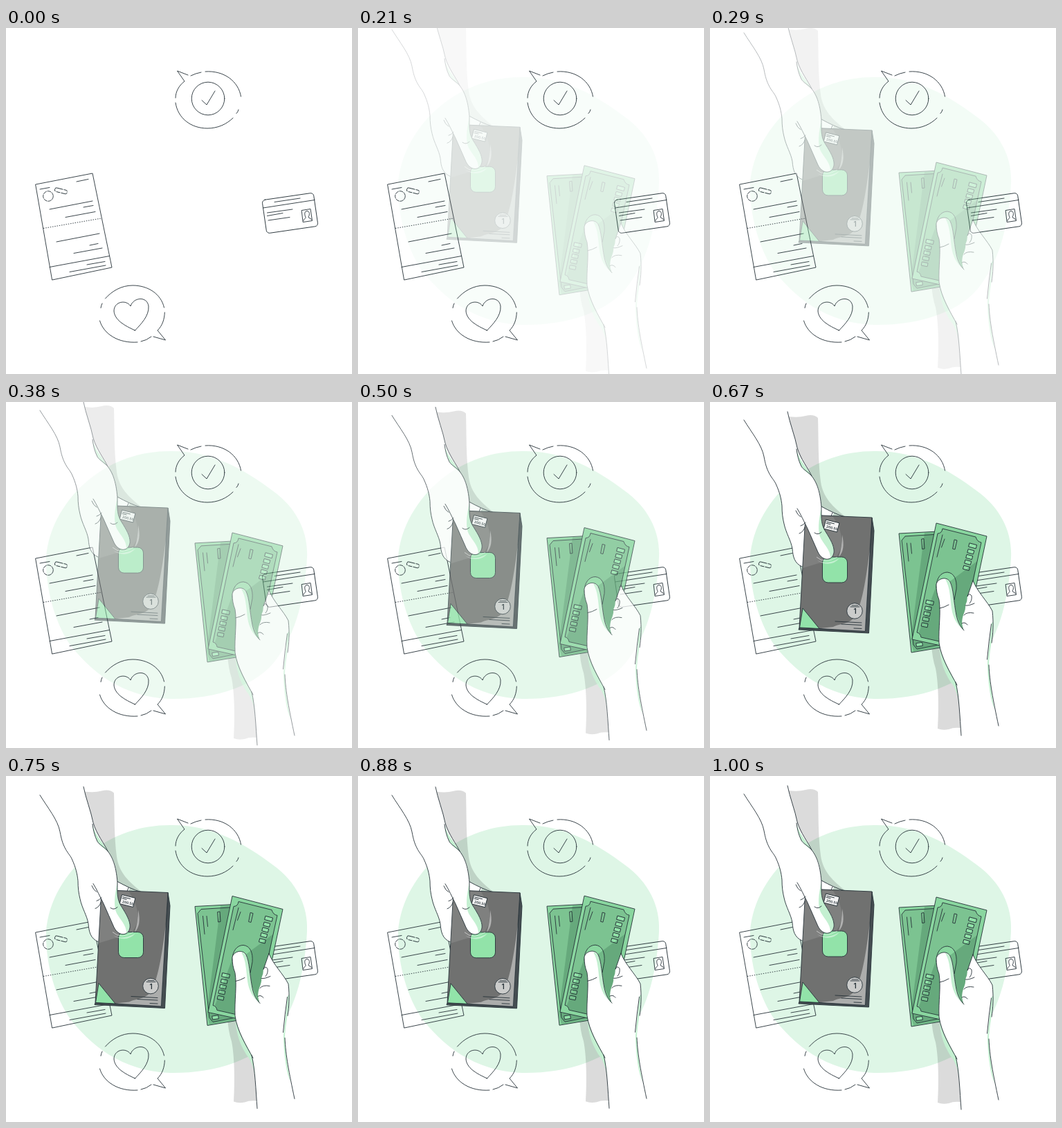
These frames come from a looping animation (500 by 500 pixels, 1.04 s). An HTML page:

```html
<!DOCTYPE html>
<html lang="en">
<head>
<meta charset="utf-8">
<title>Phone purchase</title>
<style>
  html, body { margin: 0; width: 100%; height: 100%; overflow: hidden; background: #fff; }
  svg { display: block; width: 100vw; height: 100vh; }
  .ink { fill: none; stroke: #263238; stroke-width: .9; stroke-linecap: round; stroke-linejoin: round; }
  .edge { stroke: #263238; stroke-width: .9; stroke-linejoin: round; }
  .skin { fill: #fff; }
  .tint { fill: #c4f0d1; }
  .shade { fill: #000; fill-opacity: .14; }
  .mint { fill: #92e3a9; }
  .note { fill: #89d69f; }
  .leaf { fill: #7cc391; }
  .dim { fill: #12402a; fill-opacity: .2; }
  text { font-family: Inter, Arial, sans-serif; fill: #263238; }
</style>
</head>
<body>
<svg viewBox="0 0 500 500">
  <defs>
    <rect id="cell" class="edge mint" x="-4.5" y="-2.6" width="9" height="5.2"/>
    <g id="cells">
      <rect class="edge mint" x="-5" y="-3" width="11" height="5.4"/>
      <use href="#cell" y="8.5"/>
      <use href="#cell" y="16.5"/>
      <use href="#cell" y="24.5"/>
      <use href="#cell" y="33"/>
    </g>
  </defs>

  <path id="blob" fill="#def6e6" d="M237 71C298 70 345 98 385 128C420 153 437 188 435 225C432 280 420 332 392 370C364 411 300 430 237 429C168 427 120 388 90 347C68 312 57 265 58 225C61 181 86 140 120 112C155 84 195 71 237 71Z"/>

  <!-- receipt -->
  <g class="ink">
    <path d="M43 226L125 210L153 346L67 364ZM63 345.500L149.500 329.500"/>
    <path stroke-dasharray="1.500 1.800" stroke-linecap="butt" d="M54 289.500L138 275"/>
    <path d="M49 233L63 230.500M102 222L119 218.500M63 262L125 250M112 259L126 256.500M86 273.500L129 265.500M73 309L135 297M121 314L133 311.500M98 325.500L139 318M117 342L143 337.500M92 352.500L144 343"/>
    <circle cx="61" cy="243" r="7.300" stroke-dasharray="5 1.600"/>
    <rect x="70.500" y="232.500" width="18" height="5.500" rx="2" transform="rotate(14 79 235)" stroke-dasharray="9 2 5 2"/>
  </g>

  <!-- identity card -->
  <g class="ink">
    <rect x="-37.500" y="-24.300" width="75" height="48.600" rx="4.500" transform="translate(410.500 267.500) rotate(-8.300)"/>
    <path d="M371.500 260L446 248.500M388 251.500L425 246M377.500 267L414 262M377.500 271.500L400 267.500M379 278L410 273.500"/>
    <path d="M427.500 263.500L440 261.500L442.500 278.500L429.500 280.500Z"/>
    <path d="M430 278.500C430 275 433.500 276 433 273.500C430.500 268 432 264.500 435 264.500C438.500 264.500 439.500 269 437 273C437 275.500 441 274 441.500 277"/>
  </g>

  <!-- speech bubbles -->
  <g class="ink">
    <path d="M263 68L247.500 62L258 77C250 83 245 92 245 101M245 108C248 130 267 145 291 145C306 145 319 139 328 130M333 123.500Q335.500 121 336 118M339.500 99C336 77 315 61 288 63M282 64Q274 65.500 267 69"/>
    <circle cx="292" cy="102" r="23.800"/>
    <path d="M283 104.500L290 111L302 91"/>
    <path d="M213 446L230.500 451L219 437C226 430 229 421 229.300 411M228.500 404C224 384 205 372 183 372C167 372 153 380 143.500 391M139 398Q137.500 401 137 404.500M135.500 423C141 442 162 456 190 454M195 453Q203 451.500 210 446"/>
    <path d="M186.500 437C171 430 157 422 156 409C156 395 174 392 180 402C184 389 204 387 206 402C207 416 195 428 186.500 437Z"/>
  </g>

  <g id="seller">
    <path class="shade" d="M113 21Q128 23 138 20Q150 17 156 23C157 55 156 85 160 115C163 138 178 152 196 166L160 170L128 75Z"/>
    <!-- arm, palm and far fingers -->
    <path class="skin" d="M49 26C60 44 75 62 78 79C80 90 82 96 85 102C89 110 92 112 95 118C101 131 103 140 104 150C104 160 105 168 107 176C110 190 117 200 119 212C120 224 122 233 133 238L150 200L163 180L161 152C160 142 159 130 156 123C153 116 150 111 147 107C142 96 131 83 126 66C123 50 115 30 112 14Z"/>
    <path class="tint" d="M125 68C129 84 138 92 147 107C140 102 135 98 132 93C128 85 126 76 125 68Z"/>
    <path class="ink" d="M49 26C60 44 75 62 78 79C80 90 82 96 85 102C89 110 92 112 95 118C101 131 103 140 104 150C104 160 105 168 107 176C110 190 117 200 119 212C120 224 122 233 133 238M112 14C115 30 123 50 126 66C131 83 142 96 147 107M125 68C126 76 128 85 132 93C135 98 142 101 147 107C153 115 159 126 161 152"/>
    <path class="skin" d="M161 151C168 155 174 158 179 160L176 168L161 168Z"/>
    <path class="ink" d="M161 151C172 157 184 163 195 166M175 165L177 160"/>

    <!-- box -->
    <path class="edge" fill="#454d51" d="M234 167L237 186L229.500 334L128 329L129 326L224 331Z"/>
    <path class="edge" fill="#707170" d="M138 163L234 167L224 331L129 326Z"/>
    <path fill="#fff" fill-opacity=".1" d="M138 164L178 166C194 190 194 212 180 226L134 240Z"/>
    <path fill="#fff" fill-opacity=".42" d="M231 212C227 244 221 290 210 309C202 322 186 320 178 325L160 327L224 331Z"/>
    <path class="edge mint" d="M134 298L129.500 326L158 327.500Z"/>
    <path class="ink" d="M181 317L219 319M190 321L219 322.500M208 327L219 327.500"/>
    <rect class="edge mint" x="162.500" y="224" width="36" height="37" rx="8"/>
    <circle class="edge" cx="209" cy="302" r="11.300" fill="#cbcccb"/>
    <path class="ink" d="M205 294H214M203 296H216"/>
    <text x="209.500" y="306.500" font-size="10" font-weight="600" text-anchor="middle">1</text>
    <g transform="translate(167.500 170) rotate(14)">
      <rect class="edge" width="20" height="13.500" fill="#f4f4f4"/>
      <path class="ink" d="M2 2.800H13M2 5H8"/>
      <text x="3" y="11" font-size="4.800" font-weight="600">200.50</text>
    </g>
    <path fill="#fff" fill-opacity=".45" d="M191 192Q196 214 186 224Q191 210 191 192ZM155 229Q168 236 187 226Q174 240 155 229Z"/>
    <path fill="none" stroke="#fff" stroke-opacity=".55" d="M154 224Q166 235 184 224"/>

    <!-- thumb -->
    <path class="skin" d="M126 152C131 162 136 173 141 183C146 194 151 206 156 217C160 225 166 228 171 227C177 226 180 219 179 213C178 204 171 194 165 184C160 174 161 164 161 152L150 125Z"/>
    <path class="tint" d="M161 152C161 165 160 175 165 184C171 194 180 206 179 215C179 219 177 223 174 225C174 214 165 206 160 197C155 187 157 170 161 152Z"/>
    <path class="ink" d="M126 154C131 162 136 173 141 183C146 194 151 206 156 217C160 225 166 228 171 227C177 226 180 219 179 213C178 204 171 194 165 184C160 174 161 164 161 151"/>
    <path class="ink" d="M124 157Q126 163 131 166M129 190Q135 188 137 181M131 179Q135 178 138 174M151 189Q156 193 161 188"/>
  </g>

  <g id="buyer">
    <path class="shade" d="M320 350L335 350L362 405L362 471Q352 470 345 473Q336 475 329 472C331 440 330 405 326 385Q321 370 320 350Z"/>

    <!-- back note -->
    <path class="edge note" d="M273 190L330 187L345 353L291 362Z"/>
    <path class="edge leaf" d="M282 194L332 191L345 348L299 357L294 351L277 200Z"/>
    <path class="ink" d="M284.500 204L287 230M290 204L291.500 219M306 198L309 197.500L310 212L307 212.500Z"/>
    <path class="dim" d="M310 189L327 188L294 344L335 350L334 354L294 361L290 345Z"/>
    <rect class="edge mint" x="298" y="348" width="9" height="5" transform="rotate(-8 302 350)"/>

    <!-- front note -->
    <path class="edge note" d="M327 175L400 194L365 359L292 343Z"/>
    <path class="edge leaf" d="M336 183L384 195Q386 202 392 203L361 346Q355 346 354 351L305 340Q304 334 299 333L329 190Q335 190 336 183Z"/>
    <path class="ink" d="M336 192L328 224M339 198L334.500 210M353.500 199L357 200L354 213L351 212.200Z"/>
    <use href="#cells" transform="translate(379 208) rotate(15)"/>
    <use href="#cells" transform="translate(317 290) rotate(12)"/>
    <path class="edge note" d="M327 268C327 254 334 246 343 246C353 247 357 257 356 270L353 286L335 286Z"/>
    <path class="dim" d="M347 259L386 230L381 260L372 290L366 330L356 306Z"/>
    <path class="dim" fill-opacity=".12" d="M327 266L302 333L306 340L332 346L333 300Z"/>

    <!-- hand -->
    <path class="skin" d="M327 264C328 255 342 251 347 260C352 270 352 288 356 308C358 318 362 325 367 330C363 322 364 314 366 308Q370 298 369 294Q372 288 372 281L380 258C386 274 401 288 408 302C410 320 409 335 407 348C405 358 403 368 403 380C404 405 409 430 417 468L363 482C361 455 360 425 355 405C345 385 334 367 331 348C330 326 334 305 331 286C328 278 327 272 327 264Z"/>
    <path class="tint" d="M407 319L409 318C409 340 403 365 403 380C404 400 407 425 411 444C405 430 401 400 401 376ZM332 355C336 375 349 394 356 406L361 440C359 426 356 418 351 409C340 395 332 374 332 355Z"/>
    <path class="tint" d="M340 256Q345 257 347 261C352 270 352 288 356 308C358 318 362 325 366 329C357 322 351 312 349 298C347 283 347 268 340 256Z"/>
    <path class="ink" d="M357 409C347 391 334 370 331 348C330 326 334 305 331 286C328 278 327 272 327 264C328 255 342 251 347 260C352 270 352 288 356 308C358 318 362 325 367 330M363 482C361 455 360 425 355 405M380 258C386 274 401 288 408 302C410 320 409 335 407 348M403 380C404 405 409 430 417 468M406.500 321Q403 345 400.500 372"/>
    <path class="ink" d="M380 258L372 281Q374 275 378 280Q379 287 375 291M369 294Q373 295 382 291M367 308Q371 303 381 305M364 320Q368 317 372 322M332 298Q338 297 345 293"/>
  </g>
</svg>

<script>
  const LOOP = 1040, STEPS = 25, HIDDEN = 3, SHIFT = 30;
  const [blob, seller, buyer] = ["blob", "seller", "buyer"].map(id => document.getElementById(id));

  const curve = (a, b, t) => 3 * a * t * (1 - t) ** 2 + 3 * b * t * t * (1 - t) + t ** 3;

  // Cubic ease with a slight overshoot
  function ease(x) {
    let lo = 0, hi = 1;
    for (let i = 0; i < 30; i++) {
      const mid = (lo + hi) / 2;
      if (curve(.36, .5, mid) < x) lo = mid; else hi = mid;
    }
    return curve(-.01, 1.38, hi);
  }

  function draw(ms) {
    const step = Math.floor(ms % LOOP / LOOP * STEPS + .1);
    const p = step < HIDDEN ? 0 : ease(Math.min(1, (step + 1) / STEPS));
    const away = SHIFT * (1 - p);
    for (const el of [blob, seller, buyer]) el.setAttribute("opacity", Math.min(1, p));
    seller.setAttribute("transform", `translate(0 ${-away})`);
    buyer.setAttribute("transform", `translate(0 ${away})`);
  }

  function tick() {
    draw(performance.now());
    requestAnimationFrame(tick);
  }
  tick();
</script>
</body>
</html>
```
